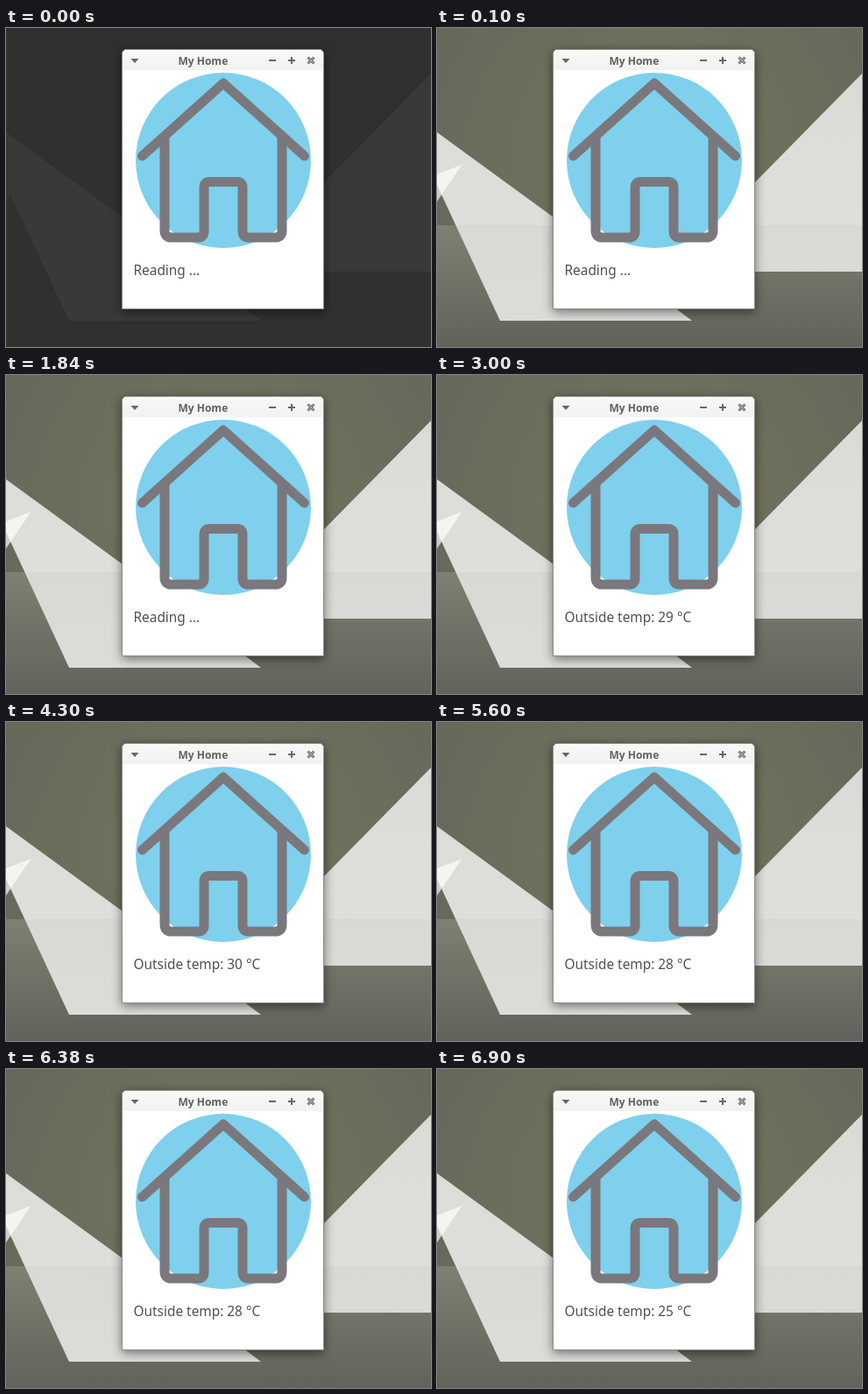
An HTML page for the animation above (8000 ms loop, 485 by 364 pixels).

```html
<!DOCTYPE html>
<html lang="en">
<head>
<meta charset="utf-8">
<title>My Home</title>
<style>
  html, body { margin: 0; width: 100%; height: 100%; overflow: hidden; background: #30302e; }
  svg { display: block; width: 485px; height: 364px; }
  text { font-family: "Noto Sans", "Open Sans", sans-serif; }
  .title { font-size: 12px; font-weight: 700; fill: #626262; }
  .status { font-size: 15.4px; fill: #505050; }
  .house { fill: none; stroke: #7a787c; stroke-width: 11; stroke-linecap: round; stroke-linejoin: round; }
  .window { filter: drop-shadow(0 3px 6px rgba(0, 0, 0, .5)); }
</style>
</head>
<body>
<svg viewBox="0 0 485 364">
  <defs>
    <radialGradient id="wall" gradientUnits="userSpaceOnUse" cx="248" cy="150" r="300">
      <stop offset="0" stop-color="#75765f"/>
      <stop offset="1" stop-color="#66675a"/>
    </radialGradient>
    <linearGradient id="floor" x2="0" y2="1">
      <stop offset="0" stop-color="#7f8072"/>
      <stop offset="1" stop-color="#61625a"/>
    </linearGradient>
    <linearGradient id="paper" gradientUnits="userSpaceOnUse" x1="0" y1="52" x2="0" y2="334">
      <stop offset="0" stop-color="#dbdbd6"/>
      <stop offset=".613" stop-color="#dededb"/>
      <stop offset=".613" stop-color="#d8d8d4"/>
      <stop offset="1" stop-color="#dcdcd9"/>
    </linearGradient>
    <linearGradient id="bar" x2="0" y2="1">
      <stop offset="0" stop-color="#f8f8f7"/>
      <stop offset="1" stop-color="#f2f2f1"/>
    </linearGradient>
    <path id="sheets" d="M0 119 133 216 291 334H72L0 179ZM485 52 362 177V278H485Z"/>
    <path id="shard" d="M28.500 156 0 167V198Z"/>
  </defs>

  <g id="dim">
    <rect width="485" height="364" fill="#30302e"/>
    <use href="#sheets" fill="#393938"/>
    <use href="#shard" fill="#393938"/>
  </g>
  <g id="lit">
    <rect width="485" height="364" fill="url(#wall)"/>
    <rect y="225" width="485" height="139" fill="url(#floor)"/>
    <use href="#sheets" fill="url(#paper)"/>
    <use href="#shard" fill="#fff" opacity=".68"/>
  </g>

  <path class="window" d="M132.500 320.500V30q0-5.500 5.500-5.500H357q5.500 0 5.500 5.500V320.500Z" fill="#fff" stroke="#8b8b87"/>
  <path d="M133 48V30q0-5 5-5H357q5 0 5 5V48Z" fill="url(#bar)"/>
  <path d="M142.500 35h9l-4.500 5Z" fill="#666"/>
  <text class="title" x="196.500" y="42">My Home</text>
  <path d="M300 37h8M322 37h8M326 33v8" stroke="#686868" stroke-width="2"/>
  <path d="m344.500 33.500 7 7m0-7-7 7" stroke="#707070" stroke-width="3"/>
  <path d="m345 34 6 6m0-6-6 6" stroke="#c4c4c4" stroke-width=".8"/>

  <circle cx="248" cy="151" r="100" fill="#7fd0ed"/>
  <g class="house">
    <path d="M155.500 146 248 63 340.500 146"/>
    <path d="M181 125V231q0 8 8 8H219q7 0 7-7V182q0-6.500 6.500-6.500H263.500q6.500 0 6.500 6.500V232q0 7 7 7H307q8 0 8-8V125"/>
  </g>
  <text class="status" id="status" x="145.500" y="282">Reading ...</text>
</svg>
<script>
  const LOOP = 8000, LIT_AT = 100;
  const reading = n => `Outside temp: ${n} °C`;
  const steps = [
    [0, "Reading ..."],
    [3000, reading(29)],
    [4300, reading(30)],
    [5600, reading(28)],
    [6900, reading(25)]
  ];
  const lit = document.getElementById("lit");
  const status = document.getElementById("status");
  const start = performance.now();

  function draw() {
    const t = (performance.now() - start) % LOOP;
    const text = steps.filter(([at]) => at <= t).pop()[1];
    lit.style.visibility = t < LIT_AT ? "hidden" : "visible";
    if (status.textContent !== text) status.textContent = text;
    requestAnimationFrame(draw);
  }
  draw();
</script>
</body>
</html>
```
